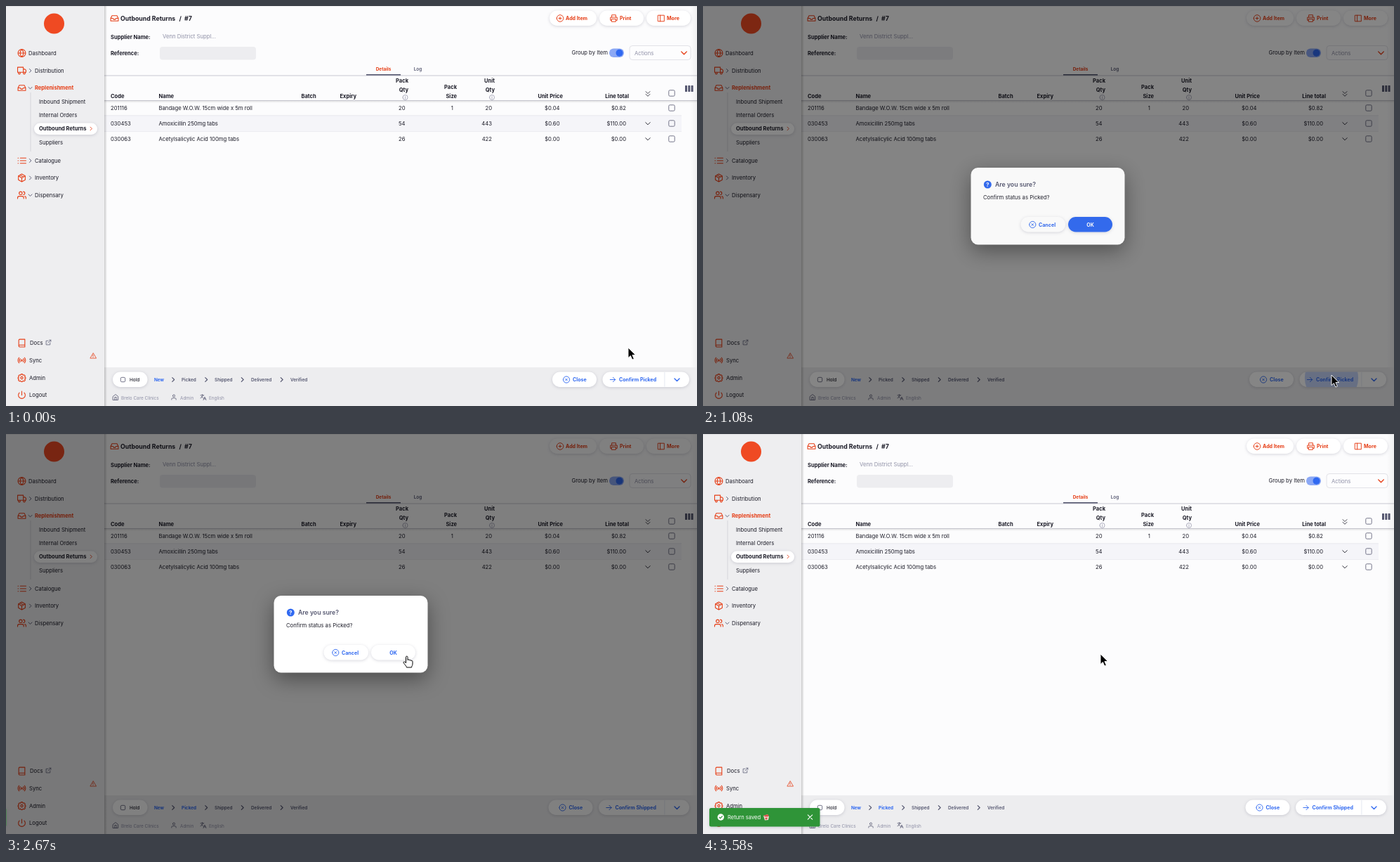
Animation, 984 px wide and 569 px high, one loop 3.66 s. Source, as an HTML page:

```html
<!DOCTYPE html>
<html lang="en">
<head>
<meta charset="utf-8">
<title>Outbound Returns</title>
<style>
html, body { margin: 0; width: 100%; height: 100%; overflow: hidden; }
svg { display: block; width: 984px; height: 569px; font-family: Inter, sans-serif; }
.pill { filter: drop-shadow(0 1px 2px rgba(60, 60, 90, .2)); }
#modal { filter: drop-shadow(0 9px 15px rgba(0, 0, 0, .4)); }
</style>
</head>
<body>
<svg id="stage" viewBox="0 0 984 569"></svg>
<script>
const ORANGE = '#e63e16', BLUE = '#3069f1', DARK = '#1c1c28', MID = '#555770', GREY = '#8f90a6';
const RING = 'M2 12a10 10 0 1 0 20 0a10 10 0 1 0-20 0';
const ICONS = {
  globe: RING + 'M2 12h20M12 2c6 6 6 14 0 20c-6-6-6-14 0-20',
  truck: 'M1 3h15v13H1zM16 8h4l3 3v5h-7M3 18.5a2.5 2.5 0 1 0 5 0a2.5 2.5 0 1 0-5 0M16 18.5a2.5 2.5 0 1 0 5 0a2.5 2.5 0 1 0-5 0',
  inbox: 'M22 12h-6l-2 3h-4l-2-3H2l3.5-7h13L22 12v7H2v-7',
  list: 'M8 5h15M8 12h15M8 19h15M2 5h1M2 12h1M2 19h1',
  box: 'M3 7l9-5 9 5v10l-9 5-9-5zM3 7l9 5 9-5M12 12v10M7.5 4.5l9 5',
  users: 'M1 21v-2a4 4 0 0 1 4-4h8a4 4 0 0 1 4 4v2M5 7a4 4 0 1 0 8 0a4 4 0 1 0-8 0M16 3a4 4 0 0 1 0 8M23 21v-2a4 4 0 0 0-3-4',
  book: 'M4 19.5A2.5 2.5 0 0 1 6.5 17H20V2H6.5A2.5 2.5 0 0 0 4 4.5v15A2.5 2.5 0 0 0 6.5 22H20v-5',
  radio: 'M10 12a2 2 0 1 0 4 0a2 2 0 1 0-4 0M7.8 16.2a6 6 0 0 1 0-8.4M16.2 7.8a6 6 0 0 1 0 8.4M4.9 19a10 10 0 0 1 0-14M19 5a10 10 0 0 1 0 14',
  gear: 'M9 12a3 3 0 1 0 6 0a3 3 0 1 0-6 0M10 2h4l1 3 3-1 3 3-1.500 3 2.500 1v3l-2.500 1 1.500 3-3 3-3-1.500-1 2.500h-4l-1-2.500-3 1.500-3-3 1.500-3-2.500-1v-3l2.500-1-1.500-3 3-3 3 1z',
  power: 'M18.4 5.6a9 9 0 1 1-12.8 0M12 2v10',
  ext: 'M18 13v8H3V6h8M15 3h6v6M10 14L21 3',
  alert: 'M12 3L1.500 21h21zM12 9v5M12 17v.5',
  plus: RING + 'M12 8v8M8 12h8',
  print: 'M6 9V2h12v7M6 18H2V9h20v9h-4M6 14h12v8H6z',
  side: 'M3 3h18v18H3zM9 3v18',
  cancel: RING + 'M15 9l-6 6M9 9l6 6',
  info: RING + 'M12 11v6M12 7v.5',
  arrow: 'M4 12h16M13 5l7 7-7 7',
  home: 'M3 9l9-7 9 7v13H3zM9 22V12h6v10',
  user: 'M4 21v-2a4 4 0 0 1 4-4h8a4 4 0 0 1 4 4v2M8 7a4 4 0 1 0 8 0a4 4 0 1 0-8 0',
  lang: 'M2 5h12M8 2v3M11 5c-1 4-4 8-9 10M5 9c2 3 4 5 7 6M12 22l5-11 5 11M14 18h6',
  down: 'M5 9l7 7 7-7', right: 'M9 5l7 7-7 7', double: 'M5 4l7 7 7-7M5 13l7 7 7-7',
  close: 'M5 5l14 14M19 5L5 19'
};

// All helpers return markup; text y is the middle of the capitals.
const text = (x, y, s, fill = DARK, size = 7.7, weight = 400, anchor = 'start') =>
  `<text x="${x}" y="${y + size * .36}" fill="${fill}" font-size="${size}" font-weight="${weight}" text-anchor="${anchor}">${s}</text>`;
const bold = (x, y, s, fill = DARK, size = 7.55, anchor) => text(x, y, s, fill, size, 700, anchor);
const icon = (name, x, y, color = ORANGE, size = 13, w = 2) =>
  `<path d="${ICONS[name]}" transform="translate(${x - size / 2} ${y - size / 2}) scale(${size / 24})" fill="none" stroke="${color}" stroke-width="${w}" stroke-linecap="round" stroke-linejoin="round"/>`;
const rect = (x, y, w, h, fill, more = '') =>
  `<rect x="${x}" y="${y}" width="${w}" height="${h}" fill="${fill}" ${more}/>`;
const pill = (x, y, w, h = 21.5, fill = '#fff') => rect(x, y, w, h, fill, `rx="${h / 2}" class="pill"`);
const check = (x, y, s = 8.4) => rect(x - s / 2, y - s / 2, s, s, 'none', 'rx="1.6" stroke="#66677d" stroke-width=".9"');

function sidebar() {
  const top = [['globe', 67, 'Dashboard'], ['truck', 92, 'Distribution', 'right'], ['inbox', 116.5, 'Replenishment', 'down'],
    ['list', 220, 'Catalogue', 'right'], ['box', 244.500, 'Inventory', 'right'], ['users', 269, 'Dispensary', 'down']];
  const low = [['book', 479.5, 'Docs', 34], ['radio', 504, 'Sync', 33], ['gear', 529, 'Admin', 33], ['power', 553.5, 'Logout', 33]];
  return rect(0, 0, 140, 569, '#eeeef0') + '<circle cx="68.500" cy="25" r="14.5" fill="#ef4a23"/>' +
    top.map(([i, y, s, c]) => icon(i, 22.5, y) + (c ? icon(c, 34.5, y, MID, 8.5, 2.6) : '') +
      (i == 'inbox' ? bold(41, y, s, ORANGE) : text(c ? 41 : 32, y, s))).join('') +
    rect(34.5, 123, 1, 84, '#d3d3da') + pill(40, 166.5, 90, 16.5) + bold(47, 174.5, 'Outbound Returns') +
    icon('right', 121, 174.5, ORANGE, 8, 2.6) +
    text(47, 136, 'Inbound Shipment') + text(47, 155.5, 'Internal Orders') + text(47, 194, 'Suppliers') +
    low.map(([i, y, s, x]) => icon(i, 22.5, y) + text(x, y, s)).join('') +
    icon('ext', 60.5, 478.5, MID, 9) + icon('alert', 124, 497.5, ORANGE, 9.5);
}

function header() {
  const buttons = [[774, 67, 'plus', 789, 797, 'Add Item'], [845, 63, 'print', 865.5, 874, 'Print'], [912, 63, 'side', 933, 941, 'More']];
  return icon('inbox', 154.5, 17.5) + bold(163, 17.5, 'Outbound Returns', DARK, 8.75) +
    bold(246.5, 17.5, '/', DARK, 8.75) + bold(254, 17.5, '#7', DARK, 8.75) +
    buttons.map(([x, w, i, ix, tx, s]) => pill(x, 6.5, w) + icon(i, ix, 17.5, ORANGE, 11.5) + bold(tx, 17.5, s, ORANGE, 7.1)).join('') +
    bold(149, 44.500, 'Supplier Name:') + text(223, 43.5, 'Venn District Suppl...', GREY) +
    bold(149, 67.5, 'Reference:') + rect(219, 58, 137, 18.5, '#ededf0', 'rx="4"') +
    text(857, 66.5, 'Group by Item', DARK, 7.7, 400, 'end') +
    rect(859, 60.500, 21, 12.5, '#8ba8f5', 'rx="6.2"') + '<circle cx="873.5" cy="66.700" r="5" fill="#3069f1"/>' +
    rect(888, 56.5, 87, 20, '#fdfdfe', 'rx="4" stroke="#e2e2e8"') + text(895, 67, 'Actions', GREY) +
    icon('down', 965.5, 66.5, ORANGE, 13, 2.6) +
    bold(537.5, 90, 'Details', ORANGE, 6.4, 'middle') + text(586.5, 90, 'Log', MID, 6.4, 600, 'middle') +
    rect(140, 98.5, 844, 1, '#c9c9d1') + rect(513, 97, 49, 1.6, MID);
}

function table() {
  const heads = [[573, 106, 'Pack'], [573, 119, 'Qty'], [642, 115, 'Pack'], [642, 128, 'Size'], [696, 106, 'Unit'],
    [696, 119, 'Qty'], [793, 128, 'Unit Price'], [887, 128, 'Line total']];
  const rows = [['201116', 'Bandage W.O.W. 15cm wide x 5m roll', 20, 1, 20, '$0.04', '$0.82'],
    ['030453', 'Amoxicillin 250mg tabs', 54, '', 443, '$0.60', '$110.00'],
    ['030063', 'Acetylsalicylic Acid 100mg tabs', 26, '', 422, '$0.00', '$0.00']];
  const ends = [568.5, 637, 692, 788.5, 883];
  return rect(140, 156, 822, 22, '#f5f5f9') + rect(140, 155.5, 822, .8, '#e3e3ea') + rect(140, 178, 822, .8, '#e9e9ef') +
    rect(140, 134, 844, 1, '#c6c6ce') + rect(140, 135, 844, 3, 'url(#drop)') +
    [[149, 'Code'], [217.5, 'Name'], [420.5, 'Batch'], [475.5, 'Expiry']].map(([x, s]) => bold(x, 128, s)).join('') +
    heads.map(([x, y, s]) => bold(x, y, s, DARK, 7.5, 'end')).join('') +
    icon('info', 568.5, 130, GREY, 8.5) + icon('info', 692, 130, GREY, 8.5) +
    icon('double', 914, 125, DARK, 10) + check(948, 124) +
    [967, 971.3, 975.6].map(x => rect(x, 113, 3, 9, MID, 'rx=".6"')).join('') +
    rows.map(([code, name, ...nums], i) => {
      const y = 145 + 22 * i;
      return text(149, y, code) + text(217.5, y, name) + check(948, y) + (i ? icon('down', 914, y, DARK, 11) : '') +
        nums.map((n, k) => text(ends[k], y, n, DARK, 7.7, 400, 'end')).join('');
    }).join('');
}

function footer() {
  const info = [['home', 156, 164, 'Brelo Care Clinics'], ['user', 239, 248, 'Admin'], ['lang', 281, 289, 'English']];
  return rect(140, 514, 844, 55, '#ededef') + pill(152, 520.5, 49.5) + check(166.5, 531.5, 6.4) +
    text(176, 531.5, 'Hold', DARK, 6.4, 500) + bold(211, 531.5, 'New', BLUE, 6.4) +
    [238, 285, 336.5, 392.5].map(x => icon('right', x, 531.5, MID, 10, 2.8)).join('') +
    [[297, 'Shipped'], [349, 'Delivered'], [405, 'Verified']].map(([x, s]) => text(x, 531.5, s, MID, 6.4, 600)).join('') +
    info.map(([i, ix, tx, s]) => icon(i, ix, 556.5, MID, 9.5) + text(tx, 557.5, s, GREY, 6.4)).join('');
}

// Status label and the right-hand buttons, before and after saving.
function actions(id, shift, next, status) {
  return `<g id="${id}">` + (status ? bold(250, 531.5, 'Picked', BLUE, 6.4) : text(250, 531.5, 'Picked', MID, 6.4, 600)) +
    pill(778 - shift, 520.5, 63) + icon('cancel', 798 - shift, 531.5, BLUE, 11) + bold(807 - shift, 531.5, 'Close', BLUE, 7.1) +
    pill(849.5 - shift, 520.5, 123.5 + shift) + rect(937.5, 521, .8, 20.5, '#dfe3ee') +
    icon('arrow', 864 - shift, 531.5, BLUE, 11) + bold(873 - shift, 531.5, 'Confirm ' + next, BLUE, 7.1) +
    icon('down', 955.5, 531.5, BLUE, 12, 2.8) + '</g>';
}

const LEFT_HALF = 'M938 520.5H860.25a10.75 10.75 0 0 0 0 21.5H938z';
const hover = `<g id="hover"><path d="${LEFT_HALF}" fill="${BLUE}"/>` + icon('arrow', 864, 531.5, '#fff', 11) +
  bold(873, 531.5, 'Confirm Picked', '#fff', 7.1) + '</g><circle id="ripple" cx="895" cy="529" clip-path="url(#half)"/>';

const modal = '<g id="modal">' + rect(381.5, 230, 219, 109.5, '#fff', 'rx="10"') +
  `<circle cx="405.3" cy="254" r="5.5" fill="${BLUE}"/>` + bold(405.3, 254, '?', '#fff', 8, 'middle') +
  text(416, 254, 'Are you sure?', MID, 8.7, 600) + text(399, 272, 'Confirm status as Picked?') +
  pill(452.5, 300, 63.5) + icon('cancel', 469.3, 311, BLUE, 11) + bold(478, 311, 'Cancel', BLUE, 7.1) +
  pill(520, 300, 63) + bold(551.5, 311, 'OK', BLUE, 7.1, 'middle') +
  '<g id="ok">' + rect(520, 300, 63, 21.5, BLUE, 'rx="10.75"') + bold(551.5, 311, 'OK', '#fff', 7.1, 'middle') + '</g></g>';

const toast = '<g id="toast">' + rect(9, 532, 157.5, 26.5, '#2f9438', 'rx="2.5" class="pill"') +
  '<circle cx="25.3" cy="545" r="4.7" fill="#fff"/><path d="M23 545l1.700 1.700 3-3.300" fill="none" stroke="#2f9438" stroke-width="1.2"/>' +
  text(35, 545, 'Return saved', '#fff', 7.6) +
  '<path d="M86 543l6-2 2 3-1 5-5 .5z" fill="#f2d6cf"/><path d="M86 543l3 1.500 5-.5-2-3zM88.500 546l3-.5v2.500l-2.500.5z" fill="#d9534a"/>' +
  icon('close', 152.5, 545, '#fff', 11, 2.4) + '</g>';

const cursor = '<g id="cursor"><path id="point" d="M0 0V14.5L3.4 11.500 5.800 17 8.300 16 5.900 10.500H10.5Z" fill="#000" stroke="#fff" stroke-width=".9"/>' +
  '<path id="hand" d="M-.5 8V1.300C-.5-.3 2-.3 2 1.300V5.500C2 4.400 4.300 4.500 4.300 6 4.500 4.900 6.700 5.200 6.700 6.700 7 5.900 9 6.100 9 7.700V11C9 13 8 13.500 7.500 16H.5C0 14-1.800 12.500-3.700 9.700-4.600 8.200-2.700 7.200-1.700 8.500L-.5 9.800Z" fill="#fff" stroke="#000" stroke-width="1"/></g>';

document.getElementById('stage').innerHTML = `<defs>
  <linearGradient id="drop" x2="0" y2="1"><stop stop-color="#000" stop-opacity=".1"/><stop offset="1" stop-opacity="0"/></linearGradient>
  <linearGradient id="edge"><stop stop-color="#000" stop-opacity=".2"/><stop offset="1" stop-opacity="0"/></linearGradient>
  <linearGradient id="fade"><stop stop-color="#000" stop-opacity="0"/><stop offset="1" stop-opacity=".05"/></linearGradient>
  <clipPath id="half"><path d="${LEFT_HALF}"/></clipPath></defs>` +
  rect(0, 0, 984, 569, '#fcfcfd') + header() + table() + footer() + sidebar() +
  rect(140, 0, 4, 569, 'url(#edge)') + rect(974, 0, 10, 514, 'url(#fade)') + rect(0, 0, 984, 1, '#000', 'opacity=".07"') +
  actions('before', 0, 'Picked', false) + actions('after', 5.5, 'Shipped', true) + hover +
  rect(0, 0, 984, 569, '#000', 'id="shade"') + modal + toast + cursor;

const el = {};
document.querySelectorAll('#stage g[id], #ripple, #shade, #point, #hand').forEach(e => el[e.id] = e);
const show = (e, on) => e.style.display = on ? '' : 'none';
const ramp = (t, start, length) => Math.min(1, Math.max(0, (t - start) / length));
const smooth = p => p * p * (3 - 2 * p);

// y of cubic-bezier(x1, 0, .2, 1) with first handle at (x1, 0)
function bezier(p, x1) {
  let lo = 0, hi = 1, s = p;
  for (let i = 0; i < 20; i++) {
    s = (lo + hi) / 2;
    const x = 3 * (1 - s) ** 2 * s * x1 + .6 * (1 - s) * s * s + s ** 3;
    if (x < p) lo = s; else hi = s;
  }
  return 3 * (1 - s) * s * s + s ** 3;
}

const PATH = [[80, 886, 486], [580, 895, 525], [1330, 895, 525], [1750, 915, 517], [2083, 583, 322],
  [2250, 570, 316], [2830, 570, 316], [3000, 566, 313]];
function pointer(t) {
  const i = PATH.findIndex(k => k[0] > t);
  if (i < 1) return (i ? PATH[PATH.length - 1] : PATH[0]).slice(1);
  const [a, b] = [PATH[i - 1], PATH[i]], p = smooth(ramp(t, a[0], b[0] - a[0]));
  return [a[1] + (b[1] - a[1]) * p, a[2] + (b[2] - a[2]) * p];
}

const LOOP = 3660, STEP = 1000 / 12, begin = performance.now();
function draw(now) {
  const clock = Math.max(0, now - begin) % LOOP;
  const t = Math.floor((clock + 4) / STEP) * STEP;   // 12 pictures per second
  const open = bezier(ramp(t, 917, 225), .4) * (1 - bezier(ramp(t, 2662, 195), .4));
  const saved = t > 2662, hand = t > 2160 && t < 2880;

  show(el.before, !saved);
  show(el.after, saved);
  show(el.hover, t < 950);
  el.hover.style.opacity = ramp(t, 400, 200);
  show(el.ripple, t > 900 && t < 1600);
  el.ripple.setAttribute('r', Math.min(48, 9 + (t - 917) * .175));
  el.ripple.setAttribute('fill', t < 950 ? '#fff' : BLUE);
  el.ripple.style.opacity = .28 * (1 - ramp(t, 1090, 450));

  el.shade.style.opacity = open * .5;
  show(el.modal, open > 0);
  el.modal.style.opacity = open;
  el.ok.style.opacity = 1 - ramp(t, 2130, 200);

  show(el.toast, saved);
  el.toast.setAttribute('transform', `translate(${-166 * (1 - bezier(ramp(t, 2667, 225), 0))} 0)`);
  el.cursor.setAttribute('transform', `translate(${pointer(t)})`);
  show(el.point, !hand);
  show(el.hand, hand);
  requestAnimationFrame(draw);
}
draw(begin);
</script>
</body>
</html>
```
